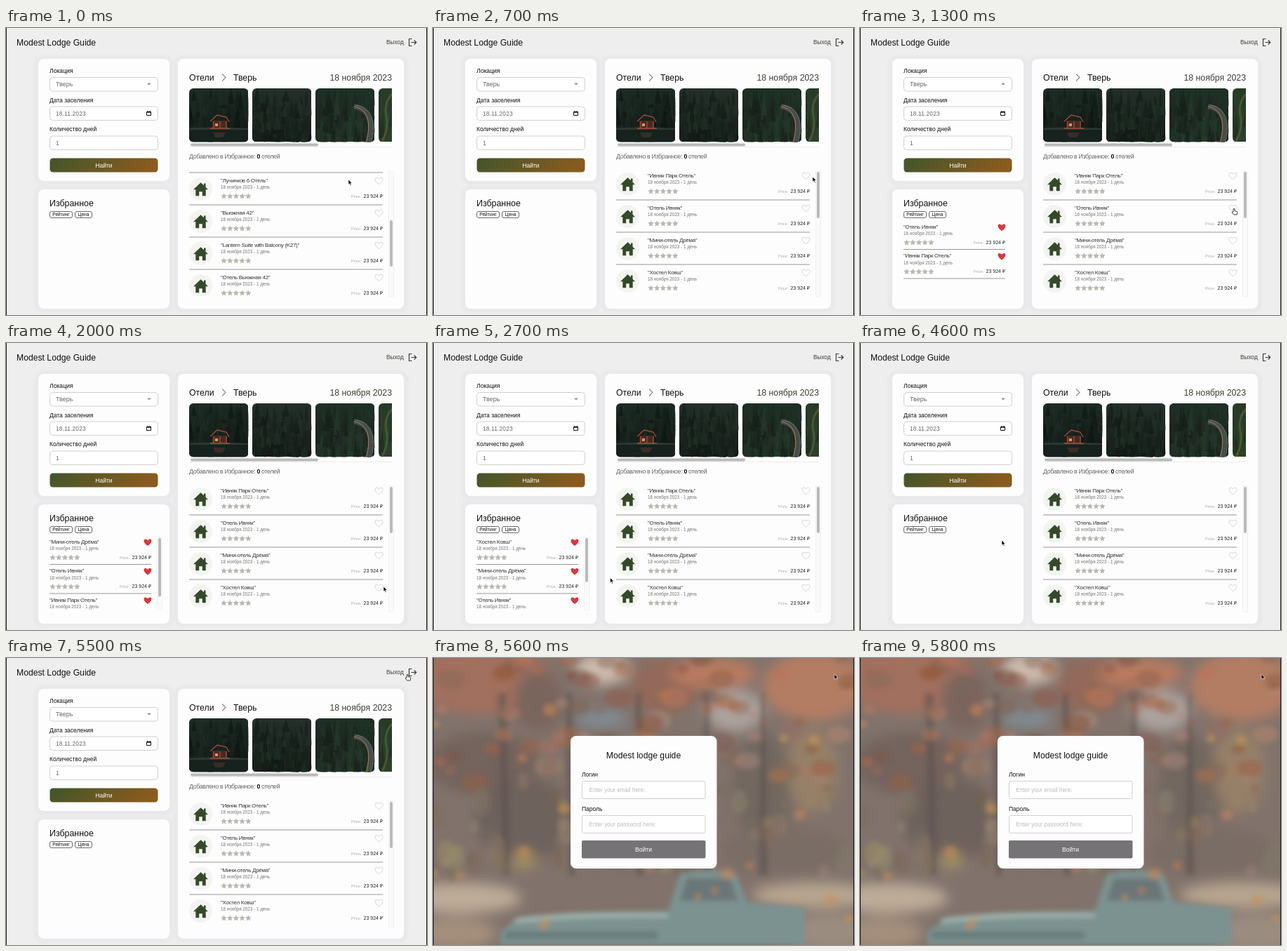
Recreate the animation shown at these times as an HTML page. Size 600x409 px, loop 5900 ms.

```html
<!DOCTYPE html>
<html lang="ru">
<head>
<meta charset="utf-8">
<title>Modest Lodge Guide</title>
<style>
  html, body { margin: 0; width: 100%; height: 100%; overflow: hidden; background: #efeeef; }
  svg { display: block; width: 600px; height: 409px; }
  text { font-family: "Liberation Sans", Arial, sans-serif; fill: #111; }
  .name { font-size: 8px; letter-spacing: -.3px; fill: #333; }
  .note { font-size: 6.3px; fill: #777; }
  .price { font-size: 5.5px; fill: #aaa; }
  .sum { font-size: 7px; fill: #222; }
  .soft { fill: #666; }
  .olive { fill: #3d4032; }
  .mid { text-anchor: middle; }
  .end { text-anchor: end; }
  .white { fill: #fff; }
  .hint { fill: #bbb; }
  .field { fill: #fff; stroke: #cfcfd3; }
  .tag { fill: #fff; stroke: #444; stroke-width: .8; }
  .card { fill: #fefdfe; }
  .thumb { fill: #bababa; }
  .track { fill: #fafafa; stroke: #ececec; stroke-width: .7; }
  .rule { stroke: #8c8c8c; stroke-width: .9; }
</style>
</head>
<body>
<svg id="stage" viewBox="0 0 600 409"></svg>
<script>
const LOOP = 5900, STEP = 100;
const HOTELS = ['Ивняк Парк Отель', 'Отель Ивняк', 'Мини-отель Дрёма', 'Хостел Ковш',
  'Лучинков 6 Отель', 'Вьюжная 42', 'Lantern Suite with Balcony (K27)', 'Отель Вьюжная 42'];
const LIKED = [900, 1300, 1700, 2300];
const UNLIKED = [3400, 3700, 4100, 4500];
const EXIT = 5600;
const ROW = 46, FAV_ROW = 41.5, FAV_VIEW = 102;

// time, x, y, hand pointer
const PATH = [
  [0, 488, 216, 0], [300, 490, 216, 0], [700, 541, 212, 0], [800, 534, 211, 1],
  [900, 533, 211, 1], [1200, 533, 256, 1], [1300, 533, 257, 1], [1600, 533, 303, 1],
  [1700, 533, 303, 1], [2000, 538, 347, 0], [2200, 533, 349, 1], [2300, 533, 349, 1],
  [2400, 520, 348, 0], [2800, 203, 332, 0], [3100, 203, 334, 0], [3300, 202, 345, 1],
  [3700, 202, 345, 1], [3900, 202, 326, 1], [4100, 202, 326, 1], [4400, 202, 285, 1],
  [4500, 202, 283, 0], [4600, 202, 281, 0], [4800, 202, 281, 0], [5300, 566, 27, 0],
  [5500, 572, 23, 1], [5600, 572, 23, 0], [5900, 572, 23, 0]
];

const ease = p => p * p * (3 - 2 * p);
const ramp = (t, a, b) => ease(Math.min(1, Math.max(0, (t - a) / (b - a))));
const text = (x, y, size, s, cls = '', more = '') =>
  `<text x="${x}" y="${y}" font-size="${size}" class="${cls}" ${more}>${s}</text>`;
const rect = (x, y, w, h, r, more = '') =>
  `<rect x="${x}" y="${y}" width="${w}" height="${h}" rx="${r}" ${more}/>`;
const path = (d, more = '') => `<path d="${d}" ${more}/>`;
const oval = (x, y, rx, ry, more) => `<ellipse cx="${x}" cy="${y}" rx="${rx}" ry="${ry}" ${more}/>`;
const clip = (id, x, y, w, h, r = 0) => `<clipPath id="${id}">${rect(x, y, w, h, r)}</clipPath>`;
const fade = (id, a, b, dir = 'x2="0" y2="1"') =>
  `<linearGradient id="${id}" ${dir}><stop stop-color="${a}"/><stop offset="1" stop-color="${b}"/></linearGradient>`;

function random(seed) {
  return () => (seed = seed * 16807 % 2147483647) / 2147483647;
}

const STAR = Array.from({ length: 10 }, (_, i) => {
  const r = i % 2 ? 2.1 : 4.6, a = i * Math.PI / 5;
  return `${(r * Math.sin(a)).toFixed(2)},${(-r * Math.cos(a)).toFixed(2)}`;
}).join(' ');
const HEART = 'M0 5C-9.3-1-5-7.6 0-2.8C5-7.6 9.3-1 0 5Z';

const stars = (x, y) => [0, 1, 2, 3, 4].map(i =>
  `<polygon points="${STAR}" transform="translate(${x + 4.5 + i * 8.7} ${y})" fill="#b9b9ae"/>`).join('');

// Shared lines of a hotel entry; y is the middle of its name
const entry = (name, x, right, y) =>
  text(x, y + 2.7, 8, `"${name}"`, 'name') +
  text(x, y + 12, 6.3, '18 ноября 2023 - 1 день', 'note') +
  stars(x, y + 22.8) +
  text(right - 45, y + 24.6, 5.5, 'Price:', 'price') +
  text(right, y + 24.8, 7, '23 924 ₽', 'sum end');

function hotelRow(name, i) {
  const y = 210 + i * ROW;
  return `<circle cx="277.5" cy="${y + 12.5}" r="16.5" fill="#f2f4f0"/>` +
    path('M0-9.5L4.5-5.4V-8.3H7V-3L10.5 .5H7.2V9.5H2.3V3.5H-2.3V9.5H-7.2V.5H-10.5Z',
      `transform="translate(277.5 ${y + 12.7})" fill="#34492a"`) +
    entry(name, 306, 537, y) +
    path(HEART, `transform="translate(531.5 ${y + .7})" fill="#fff" stroke="#cdcdcd" stroke-width=".9"`) +
    `<line x1="261" x2="537" y1="${y + 35}" y2="${y + 35}" class="rule"/>`;
}

function favRow(name, i) {
  const y = 283 + i * FAV_ROW;
  return entry(name, 62, 207, y) +
    path(HEART, `transform="translate(202 ${y + 1})" fill="#d8383f"`) +
    `<line x1="62" x2="207" y1="${y + 32.5}" y2="${y + 32.5}" class="rule"/>`;
}

function trees(x, base, count, seed, hue, light) {
  const rnd = random(seed);
  let out = '';
  for (let i = 0; i < count; i++) {
    const cx = x + rnd() * 84, top = 84 + rnd() * (base - 100), w = 2 + rnd() * 4, h = 14 + rnd() * 24;
    out += path(`M${cx} ${top}l${w} ${h}h${-2 * w}Z`,
      `fill="hsl(${hue},${12 + rnd() * 12}%,${light + rnd() * 9}%)" opacity=".7"`);
  }
  return out;
}

function photos() {
  const frame = (n, body) => `<g clip-path="url(#photo${n})">${rect(261 + n * 90, 86, 84, 76, 0, `fill="url(#wood${n})"`)}${body}</g>`;
  const cabin = trees(261, 146, 80, 71, 150, 7) +
    rect(261, 143, 84, 20, 0, 'fill="#17211e"') +
    path('M261 143Q285 140 345 143V145H261Z', 'fill="#2b3830"') +
    path('M294 132H315V143H294Z', 'fill="#472a23"') +
    path('M291 133L301 124L314 127L318 134M296 133V143M305 133V143M314 133V143M291 143H319',
      'fill="none" stroke="#a34d39" stroke-width="1.3"') +
    path('M298 136h4v4h-4z', 'fill="#d9955c"') +
    path('M295 149h18l-4 7h-11Z', 'fill="#46332b" opacity=".7"');
  const mist = trees(351, 165, 90, 19, 140, 8);
  const bend = trees(441, 164, 110, 43, 140, 10) +
    path('M496 112C516 114 525 132 516 164', 'fill="none" stroke="#454d49" stroke-width="7"') +
    path('M496 112C514 115 522 132 513 164', 'fill="none" stroke="#b87552" stroke-width="1"') +
    path('M499 110C520 113 529 133 520 164', 'fill="none" stroke="#868b84" stroke-width=".7"');
  const edge = trees(531, 160, 60, 88, 120, 13) +
    path('M550 94Q538 108 542 125T536 162', 'fill="none" stroke="#4a5635" stroke-width="3"');
  return `<g clip-path="url(#strip)">${frame(0, cabin)}${frame(1, mist)}${frame(2, bend)}${frame(3, edge)}</g>`;
}

const card = (x, y, w, h) =>
  rect(x - 6, y - 5, w + 12, h + 11, 12, 'fill="#e9e8ea" filter="url(#halo)"') + rect(x, y, w, h, 8, 'class="card"');
const field = (x, y, w, h, r) => rect(x + .5, y + .5, w - 1, h - 1, r, 'class="field"');

function formCard() {
  return card(46, 44, 187, 174) +
    text(62, 64, 8.6, 'Локация') + field(62, 70, 155, 20.5, 4) +
    text(71, 83.3, 9, 'Тверь', 'soft') + path('M201 78.5h6l-3 3.2Z', 'fill="#999"') +
    text(62, 105.5, 8.5, 'Дата заселения') + field(62, 111.5, 155, 20.5, 4) +
    text(71, 124.8, 8.4, '18.11.2023', 'soft', 'letter-spacing=".15"') +
    path('M200.5 119.5h6v5h-6zM200 120.2h7M202 117.8v1.4M205 117.8v1.4', 'fill="none" stroke="#111" stroke-width="1"') +
    text(62, 147.3, 8.5, 'Количество дней') + field(62, 153.5, 155, 20.5, 4) +
    text(71, 166.8, 8.6, '1', 'soft') +
    rect(62.5, 185.5, 154, 20, 4.5, 'fill="url(#button)"') + text(139.5, 198.5, 8.5, 'Найти', 'mid white');
}

function favCard() {
  return card(46, 230, 187, 170) +
    text(62, 254, 12.4, 'Избранное') +
    rect(62.5, 261.5, 32, 9, 2.5, 'class="tag"') + text(78.5, 268.3, 6.7, 'Рейтинг', 'mid') +
    rect(98.5, 261.5, 24, 9, 2.5, 'class="tag"') + text(110.5, 268.3, 6.7, 'Цена', 'mid') +
    '<g id="favs"></g>';
}

function hotelCard() {
  return card(245, 44, 322, 356) +
    text(261, 74.5, 12.3, 'Отели') +
    path('M308 65.5l5 5l-5 5', 'fill="none" stroke="#888" stroke-width="1.1"') +
    text(324, 74.5, 12.3, 'Тверь') + text(550, 74.5, 12.3, '18 ноября 2023', 'end olive') +
    photos() +
    '<line x1="261" x2="550" y1="169.5" y2="169.5" stroke="#ededed"/>' +
    rect(263, 164.5, 182, 4, 2, 'class="thumb"') +
    text(261, 185.5, 8.8, 'Добавлено в Избранное: <tspan font-weight="bold" fill="#111">0</tspan> отелей', 'soft', 'letter-spacing="-.33"') +
    `<g clip-path="url(#listView)"><g id="list">${HOTELS.map(hotelRow).join('')}</g></g>` +
    rect(545.5, 204, 7, 179, 0, 'class="track"') + rect(547, 205, 4, 66, 2, 'class="thumb" id="listThumb"');
}

// Soft autumn backdrop: x, y, rx, ry, colour
const BLOBS = [
  [70, 30, 100, 50, '#a2705e'], [240, 16, 40, 22, '#cdbbad'], [150, 60, 34, 44, '#7a655d'],
  [330, 40, 50, 40, '#92695a'], [430, 75, 42, 30, '#aca29e'], [400, 22, 60, 22, '#b97a60'],
  [545, 40, 75, 50, '#b37d64'], [240, 86, 36, 14, '#7f8b93'], [70, 150, 80, 45, '#74635d'],
  [130, 230, 70, 60, '#6e625d'], [470, 185, 45, 75, '#726761'], [540, 160, 36, 60, '#978068'],
  [500, 275, 90, 35, '#7a6d65'], [130, 287, 16, 13, '#a59260'], [40, 342, 85, 22, '#bdab98'],
  [545, 338, 90, 18, '#b8a690'], [570, 390, 70, 26, '#9b8c80'], [30, 392, 60, 22, '#a48f7c']
];

const foliage = (count, seed, spot) => {
  const rnd = random(seed);
  return Array.from({ length: count }, () => spot(rnd)).join('');
};

function login() {
  const blobs = BLOBS.map(([x, y, rx, ry, c]) => oval(x, y, rx, ry, `fill="${c}"`)).join('');
  const trunks = [92, 188, 288, 386, 468].map((x, i) =>
    path(`M${x} 50l${8 - i * 3} 260h${9 + i}l-4-260Z`, 'fill="#564c49" opacity=".45"')).join('');
  const crown = foliage(90, 307, rnd => {
    const y = rnd() ** 1.6 * 190, r = 5 + rnd() * 15;
    return oval(rnd() * 600, y, r, r * .7, `fill="hsl(${12 + rnd() * 12},${18 + rnd() * 26}%,${38 + rnd() * 22}%)" opacity=".5"`);
  });
  const brush = foliage(60, 911, rnd => {
    const r = 4 + rnd() * 10;
    return oval(rnd() * 600, 150 + rnd() * 165, r, r * 1.5, `fill="hsl(${18 + rnd() * 40},${8 + rnd() * 20}%,${36 + rnd() * 20}%)" opacity=".4"`);
  });
  const leaves = foliage(22, 58, rnd => {
    const r = 5 + rnd() * 5;
    return oval(rnd() * 600, 60 + rnd() * 340, r, r * .9, `fill="hsl(${20 + rnd() * 18},48%,56%)" opacity=".6"`);
  });
  const truck = path('M96 392Q112 368 200 363L335 360L352 308Q390 298 432 308L448 348L530 356V409H96Z', 'fill="#7c9290"') +
    path('M362 314H424L434 346H352Z', 'fill="#6b7678"') +
    path('M120 370Q210 360 335 364V370Q210 368 112 378Z', 'fill="#9fb0ac"') +
    path('M104 390H320V400H102Z', 'fill="#667a79"');
  return rect(0, 0, 600, 409, 0, 'fill="#81736c"') +
    `<g filter="url(#blurBig)">${blobs}</g>` +
    `<g filter="url(#blurSmall)">${trunks}${crown}${brush}${truck}${leaves}</g>` +
    rect(196, 111, 208.5, 189, 8, 'class="card"') +
    text(300, 142.5, 12.2, 'Modest lodge guide', 'mid') +
    text(212, 169, 8.5, 'Логин') + field(212, 175, 176.5, 26, 2) +
    text(222.5, 190.5, 8.13, 'Enter your email here:', 'hint') +
    text(212, 218, 8.5, 'Пароль') + field(212, 224, 176.5, 26, 2) +
    text(222.5, 239.5, 8.13, 'Enter your password here:', 'hint') +
    rect(212, 260, 176.5, 25.5, 2, 'fill="#757376"') + text(300, 275.5, 8.5, 'Войти', 'mid white');
}

const stage = document.getElementById('stage');
const blur = (id, n) => `<filter id="${id}" x="-20%" y="-20%" width="140%" height="140%"><feGaussianBlur stdDeviation="${n}"/></filter>`;
stage.innerHTML = '<defs>' +
  blur('halo', 1.5) + blur('blurBig', 9) + blur('blurSmall', 3.5) +
  fade('button', '#40552b', '#8a5b1e', 'x2="1" y2=".15"') +
  fade('wood0', '#1d2c24', '#111b17') + fade('wood1', '#26302b', '#131a17') +
  fade('wood2', '#1d3024', '#233a28') + fade('wood3', '#253c25', '#2c4128') +
  [0, 1, 2, 3].map(n => clip('photo' + n, 261 + n * 90, 86, 84.5, 76.5, 6)).join('') +
  clip('strip', 261, 86, 289, 77) + clip('listView', 260, 205, 285, 177) + clip('favView', 60, 277, 163, 103) +
  '</defs>' +
  `<g id="home">${rect(0, 0, 600, 409, 0, 'fill="#efeeef"')}` +
  text(15, 24.5, 12.2, 'Modest Lodge Guide') + text(542, 22.5, 8.3, 'Выход', 'olive') +
  path('M578.5 15.5H574.5V25.5H578.5M577.5 20.5H584.5M581.7 17.5L584.7 20.5L581.7 23.5', 'fill="none" stroke="#34402c" stroke-width="1.2"') +
  formCard() + favCard() + hotelCard() + '</g>' +
  `<g id="login">${login()}</g>` +
  rect(0, 0, 1, 409, 0, 'fill="#1c1b1e"') + rect(599, 0, 1, 409, 0, 'fill="#1c1b1e"') +
  '<g id="pointer">' +
  path('M0 0V7.2L1.7 5.7L2.9 8.4L4.1 7.9L2.9 5.2H5.2Z', 'id="arrow" fill="#000" stroke="#fff" stroke-width=".6"') +
  path('M-.9 5.2V.9Q0-.6 .9 .9V3.6L4.2 4.3Q5 4.6 4.9 5.6L4.2 9H-.4L-2.9 5.9Q-2.8 4.5-.9 5.2Z',
    'id="hand" fill="#fff" stroke="#111" stroke-width=".8"') + '</g>';

const el = Object.fromEntries(['home', 'login', 'favs', 'list', 'listThumb', 'pointer', 'arrow', 'hand']
  .map(id => [id, document.getElementById(id)]));
const show = (node, on) => node.setAttribute('visibility', on ? 'visible' : 'hidden');

function drawFavs(t) {
  const names = HOTELS.slice(0, 4).filter((_, i) => t >= LIKED[i] && t < UNLIKED[i]).reverse();
  const full = names.length * FAV_ROW, spare = Math.max(0, full - FAV_VIEW);
  const scroll = spare * ramp(t, 2700, 3100);
  let out = `<g clip-path="url(#favView)"><g transform="translate(0 ${-scroll})">${names.map(favRow).join('')}</g></g>`;
  if (spare) {
    const k = FAV_VIEW / full;
    out += rect(215.5, 277.5, 7, 103, 0, 'class="track"') + rect(217, 278 + scroll * k, 4, FAV_VIEW * k, 2, 'class="thumb"');
  }
  el.favs.innerHTML = out;
}

function drawPointer(t) {
  const i = PATH.findIndex(p => p[0] > t);
  const [t0, x0, y0, hand] = PATH[i - 1], [t1, x1, y1] = PATH[i];
  const p = ramp(t, t0, t1);
  el.pointer.setAttribute('transform', `translate(${x0 + (x1 - x0) * p} ${y0 + (y1 - y0) * p})`);
  show(el.arrow, !hand);
  show(el.hand, hand);
}

function draw(t) {
  show(el.home, t < EXIT);
  show(el.login, t >= EXIT);
  const scroll = 177 * (1 - ramp(t, 0, 500));
  el.list.setAttribute('transform', `translate(0 ${-scroll})`);
  el.listThumb.setAttribute('y', 205 + scroll * .39);
  drawFavs(t);
  drawPointer(t);
}

const start = performance.now();
let last = -1;
function tick() {
  // look one refresh ahead, then hold each step
  const t = Math.floor((performance.now() - start + 16) % LOOP / STEP) * STEP;
  if (t !== last) draw(last = t);
  requestAnimationFrame(tick);
}
tick();
</script>
</body>
</html>
```
